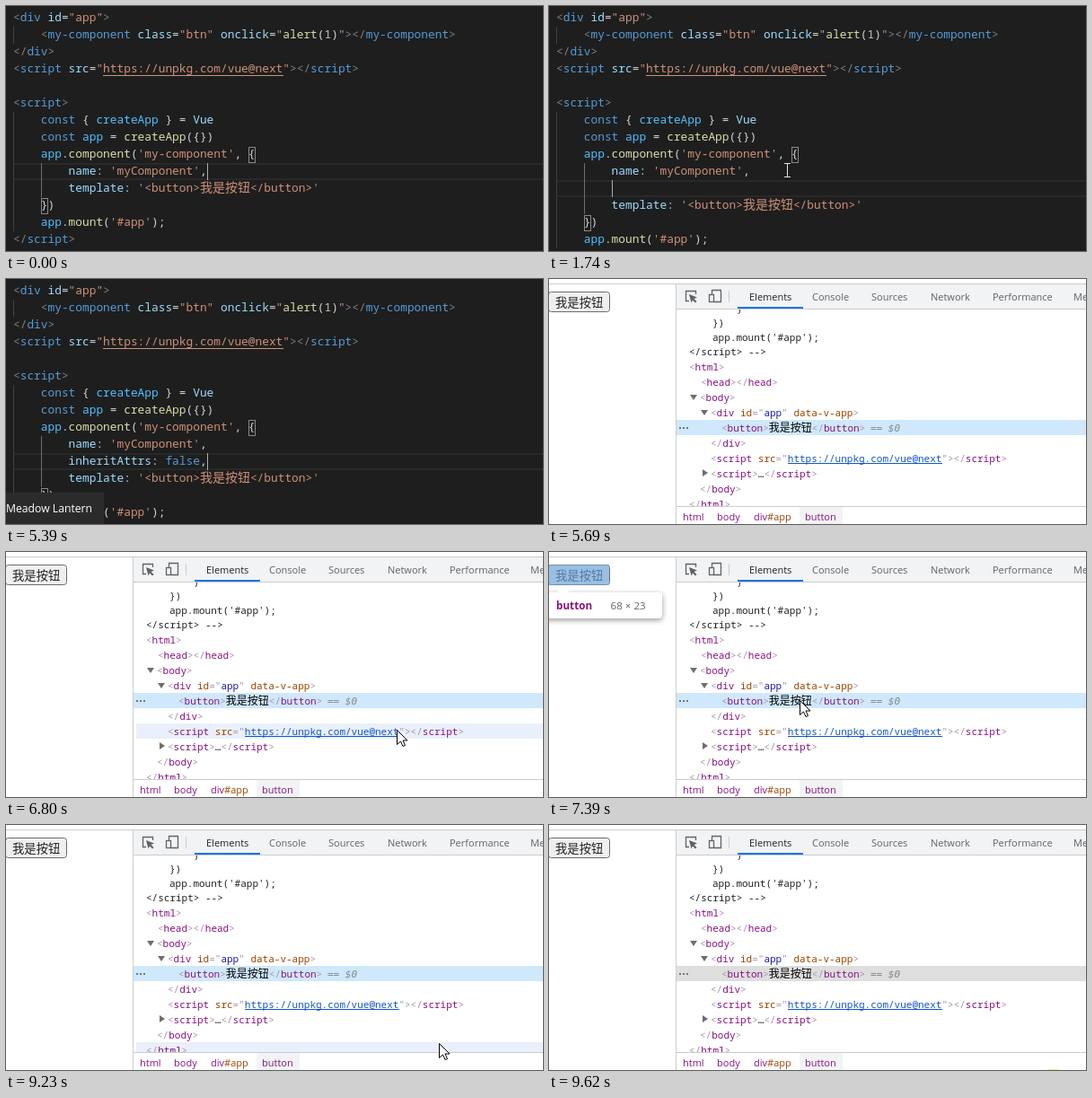
An HTML page with a canvas for the animation above (9.68 s loop, 598x273 px).

```html
<!DOCTYPE html>
<html lang="zh">
<head>
<meta charset="utf-8">
<title>inheritAttrs</title>
<style>
html, body { margin: 0; width: 598px; height: 273px; overflow: hidden; background: #1e1e1e; }
canvas { display: block; }
</style>
</head>
<body>
<canvas id="stage" width="598" height="273"></canvas>
<script>
const c = document.getElementById('stage').getContext('2d');
const LOOP = 9680;
const SANS = '"Open Sans", "Noto Sans", sans-serif';
const CJK = '"Noto Sans CJK SC", "Noto Sans CJK", sans-serif';

// Markup: runs split by "~", each starting with a colour key.
const COLORS = {
  g: '#808080', b: '#569cd6', a: '#9cdcfe', w: '#d4d4d4', o: '#ce9178',
  y: '#dcdcaa', k: '#4fc1ff', n: '#b5cea8',
  P: '#a894a6', T: '#881280', N: '#994500', V: '#1a1aa6', L: '#1155cc',
  C: '#222', B: '#000', G: '#80868b'
};

const CODE = [
  [0, 'g<~bdiv~a id~w=~o"app"~g>'],
  [1, 'g<~bmy-component~a class~w=~o"btn"~a onclick~w=~o"~yalert~w(~n1~w)~o"~g></~bmy-component~g>'],
  [0, 'g</~bdiv~g>'],
  [0, 'g<~bscript~a src~w=~o"https://unpkg.com/vue@next"~g></~bscript~g>'],
  [0, 'g'],
  [0, 'g<~bscript~g>'],
  [1, 'bconst~w { ~kcreateApp~w } = ~aVue'],
  [1, 'bconst~k app~w = ~ycreateApp~w({})'],
  [1, "kapp~w.~ycomponent~w(~o'my-component'~w, {"],
  [2, "aname:~o 'myComponent'~w,"],
  [2, "atemplate:~o '<button>我是按钮</button>'"],
  [1, 'w})'],
  [1, "kapp~w.~ymount~w(~o'#app'~w);"],
  [0, 'g</~bscript~g>']
];
const NEW_LINE = 'ainheritAttrs:~b false~w,';
const TYPED = [[1740, 0], [2240, 3], [2340, 7], [2740, 13], [2840, 17], [2940, 19], [3370, 20]];
const BLINKS = [340, 840, 1340, 1740, 3860, 4360, 4860, 5390];

const COMMENT = [
  [209, 'C}'],
  [182, 'C})'],
  [182, "Capp.mount('#app');"],
  [156, 'C</' + 'script> -->']
];
const TREE = [
  [156, 'P<~Thtml~P>'],
  [169, 'P<~Thead~P></~Thead~P>'],
  [168, 'P<~Tbody~P>'],
  [180, 'P<~Tdiv~N id~P="~Vapp~P"~N data-v-app~P>'],
  [192, 'P<~Tbutton~P>~B我是按钮~P</~Tbutton~P>'],
  [180, 'P</~Tdiv~P>'],
  [180, 'P<~Tscript~N src~P="~Lhttps://unpkg.com/vue@next~P"></~Tscript~P>'],
  [180, 'P<~Tscript~P>~B…~P</~Tscript~P>'],
  [168, 'P</~Tbody~P>'],
  [156, 'P</~Thtml~P>']
];

// Pointer paths: [time, x, y]
const BEAM = [[130, 450, 258], [930, 265, 183], [4260, 265, 183], [5100, 30, 288]];
const ARROW = [[6180, 560, 268], [6380, 512, 245], [6600, 480, 225], [6800, 435, 198],
  [7390, 251, 159], [7790, 251, 159], [7890, 240, 155], [8100, 240, 155],
  [8700, 310, 186], [9030, 395, 202], [9130, 440, 225], [9330, 560, 275]];

function pointAt(path, t) {
  t = Math.floor(t / 100) * 100;
  const i = path.findIndex(p => p[0] > t);
  if (i < 1) return null;
  const [t0, x0, y0] = path[i - 1], [t1, x1, y1] = path[i];
  const u = (t - t0) / (t1 - t0);
  return [Math.round(x0 + (x1 - x0) * u), Math.round(y0 + (y1 - y0) * u)];
}

function box(x, y, w, h, color) {
  c.fillStyle = color;
  c.fillRect(x, y, w, h);
}

function frame(x, y, w, h, color) {
  c.strokeStyle = color;
  c.lineWidth = 1;
  c.strokeRect(x + .5, y + .5, w - 1, h - 1);
}

function text(s, x, y, color, font) {
  c.fillStyle = color;
  c.font = font;
  c.fillText(s, x, y);
}

function shape(points, fill, stroke) {
  c.beginPath();
  points.forEach(p => c.lineTo(...p));
  c.closePath();
  c.fillStyle = fill;
  c.fill();
  if (stroke) {
    c.strokeStyle = stroke;
    c.lineWidth = 1;
    c.stroke();
  }
}

function rounded(x, y, w, h, r, fill) {
  c.beginPath();
  c.roundRect(x, y, w, h, r);
  c.fillStyle = fill;
  c.fill();
}

// Monospaced markup on a fixed grid; CJK glyphs are one em wide.
function mono(markup, x, y, size, max = 999) {
  const step = size * .55, latin = `${step / .6}px "Noto Sans Mono", monospace`;
  for (const run of markup.split('~'))
    for (const ch of run.slice(1)) {
      if (max-- <= 0) return;
      const wide = ch > '\u2fff';
      text(ch, x, y, COLORS[run[0]], wide ? `${size}px ${CJK}` : latin);
      x += wide ? size : step;
    }
}

function drawBeam([x, y]) {
  for (const [color, w] of [['#1e1e1e', 3], ['#e4e4e4', 1]]) {
    c.strokeStyle = color;
    c.lineWidth = w;
    c.beginPath();
    c.moveTo(x - 3, y - 7.5); c.lineTo(x + 4, y - 7.5);
    c.moveTo(x + .5, y - 7.5); c.lineTo(x + .5, y + 7.5);
    c.moveTo(x - 3, y + 7.5); c.lineTo(x + 4, y + 7.5);
    c.stroke();
  }
}

function drawArrow([x, y]) {
  const outline = [[0, 0], [0, 16], [4, 12.5], [6.5, 18], [9, 17], [6.5, 11.5], [11.5, 11.5]];
  shape(outline.map(([dx, dy]) => [x + .5 + dx, y + .5 + dy]), '#fff', '#000');
}

function editor(t) {
  const added = t >= 1740 ? 1 : 0, top = i => 4 + 19 * i;
  const row = 9 + added;
  const typed = added ? TYPED.filter(s => t >= s[0]).pop()[1] : 20;
  box(0, 0, 598, 273, '#1e1e1e');
  box(8, top(row), 590, 2, '#292929');
  box(8, top(row) + 17, 590, 2, '#292929');
  box(8, top(1), 1, 19, '#404040');
  box(8, top(6), 1, 19 * (7 + added), '#404040');
  box(39, top(9), 1, 19 * (2 + added), '#707070');
  frame(270, top(8) + 1, 8, 18, '#888');
  frame(39, top(11 + added) + 1, 8, 18, '#888');

  CODE.forEach(([level, line], i) =>
    mono(line, 8 + 30.8 * level, top(i + (i > 9 ? added : 0)) + 13, 14));
  if (added) mono(NEW_LINE, 69.6, top(10) + 13, 14, typed);
  box(108, 77, 201, 1, COLORS.o);

  if (BLINKS.filter(b => t >= b).length % 2 === 0)
    box(Math.round(69.6 + typed * 7.7), top(row), 1, 19, '#aeafad');
  const p = pointAt(BEAM, t);
  if (p) drawBeam(p);
  if (t >= 5000) {
    box(0, 238, 109, 35, '#2b2b2b');
    text('Meadow Lantern', 0, 260, '#fff', `12.2px ${SANS}`);
  }
}

function page(target) {
  c.beginPath();
  c.roundRect(-.5, 14.5, 68, 22, 3);
  c.fillStyle = '#efefef';
  c.fill();
  c.strokeStyle = '#6b6b6b';
  c.lineWidth = 1;
  c.stroke();
  text('我是按钮', 7, 30.5, '#222', `13.33px ${CJK}`);
  if (!target) return;

  const [name, id, w] = target;
  box(0, 14, w - 1, 23, 'rgba(111,168,220,.66)');
  c.save();
  c.shadowColor = 'rgba(0,0,0,.4)';
  c.shadowBlur = 6;
  c.shadowOffsetY = 2;
  rounded(-5, 45, 131, 29, 4, '#fff');
  c.restore();
  shape([[8, 46], [16, 38], [24, 46]], '#fff');
  const bold = `bold 11.7px ${SANS}`;
  text(name, 8, 64, COLORS.T, bold);
  text(id, 8 + c.measureText(name).width, 64, COLORS.V, bold);
  text(`${w} × 23`, 68.5, 64, '#5f6368', `11.6px ${SANS}`);
}

function toolbar() {
  box(142, 5, 456, 28, '#f1f3f4');
  box(0, 5, 598, 1, '#cacdd1');
  box(142, 33, 456, 1, '#cacdd1');
  c.strokeStyle = '#5f6368';
  c.lineWidth = 1.3;
  c.beginPath();
  c.moveTo(156, 24.5); c.lineTo(152.5, 24.5); c.lineTo(152.5, 13.5);
  c.lineTo(163.5, 13.5); c.lineTo(163.5, 17);
  c.rect(181.5, 12.5, 10, 13);
  c.stroke();
  shape([[156, 17], [165, 20.5], [161.5, 22], [164.5, 25], [163, 26.5], [160, 23.5], [158.5, 26.5]], '#5f6368');
  box(178, 17, 6, 10, '#f1f3f4');
  c.strokeRect(178.5, 17.5, 5, 8);
  box(200, 13, 1, 13, '#cacdd1');
  [['Elements', 223], ['Console', 293], ['Sources', 359], ['Network', 425],
    ['Performance', 494], ['Memory', 584]].forEach(([s, x], i) =>
    text(s, x, 24, i ? '#5f6368' : '#202124', `11px ${SANS}`));
  box(210, 31, 73, 2, '#1a73e8');
}

function crumbs() {
  box(142, 253, 456, 20, '#fff');
  box(142, 253, 456, 1, '#cacdd1');
  box(279, 254, 48, 19, '#f1f3f4');
  const font = `11px ${SANS}`;
  [['html', 149], ['body', 187], ['div', 228], ['button', 285]].forEach(([s, x]) =>
    text(s, x, 269, COLORS.T, font));
  text('#app', 228 + c.measureText('div').width, 269, COLORS.N, font);
}

function browser(t) {
  const p = pointAt(ARROW, t);
  const hover = p && p[1] < 253 ? Math.floor((p[1] - 89) / 17) : -1;
  const target = hover === 4 ? ['button', '', 68]
    : hover === 3 || hover === 5 ? ['div', '#app', 134] : null;
  box(0, 0, 598, 273, '#fff');
  page(target);
  box(141, 5, 1, 268, '#cacdd1');
  if (hover > 5) box(145, 89 + 17 * hover, 453, 17, '#e9f0fb');
  box(142, 157, 456, 17, t < 9620 ? '#cfe8fc' : '#dedede');

  COMMENT.forEach(([x, line], i) => mono(line, x, 37 + 16 * i, 12));
  TREE.forEach(([x, line], i) => mono(line, x, 102 + 17 * i, 12));
  box(266, 205, 172, 1, COLORS.L);
  text('== $0', 358, 170, COLORS.G, 'italic 11px "DejaVu Sans Mono", monospace');
  for (const x of [145, 149, 153]) box(x, 165, 2, 2, '#6e7780');
  for (const [x, y] of [[157, 129], [169, 146]])
    shape([[x, y], [x + 8, y], [x + 4, y + 6]], '#6e6e6e');
  shape([[171, 212], [171, 220], [177, 216]], '#6e6e6e');
  toolbar();
  crumbs();
  if (t >= 9620) box(555, 272, 13, 1, '#f6ee8c');
  if (p) drawArrow(p);
}

function draw(now) {
  const t = now % LOOP;
  (t < 5690 ? editor : browser)(t);
  requestAnimationFrame(() => draw(performance.now() - start));
}
const start = performance.now();
draw(0);
</script>
</body>
</html>
```
